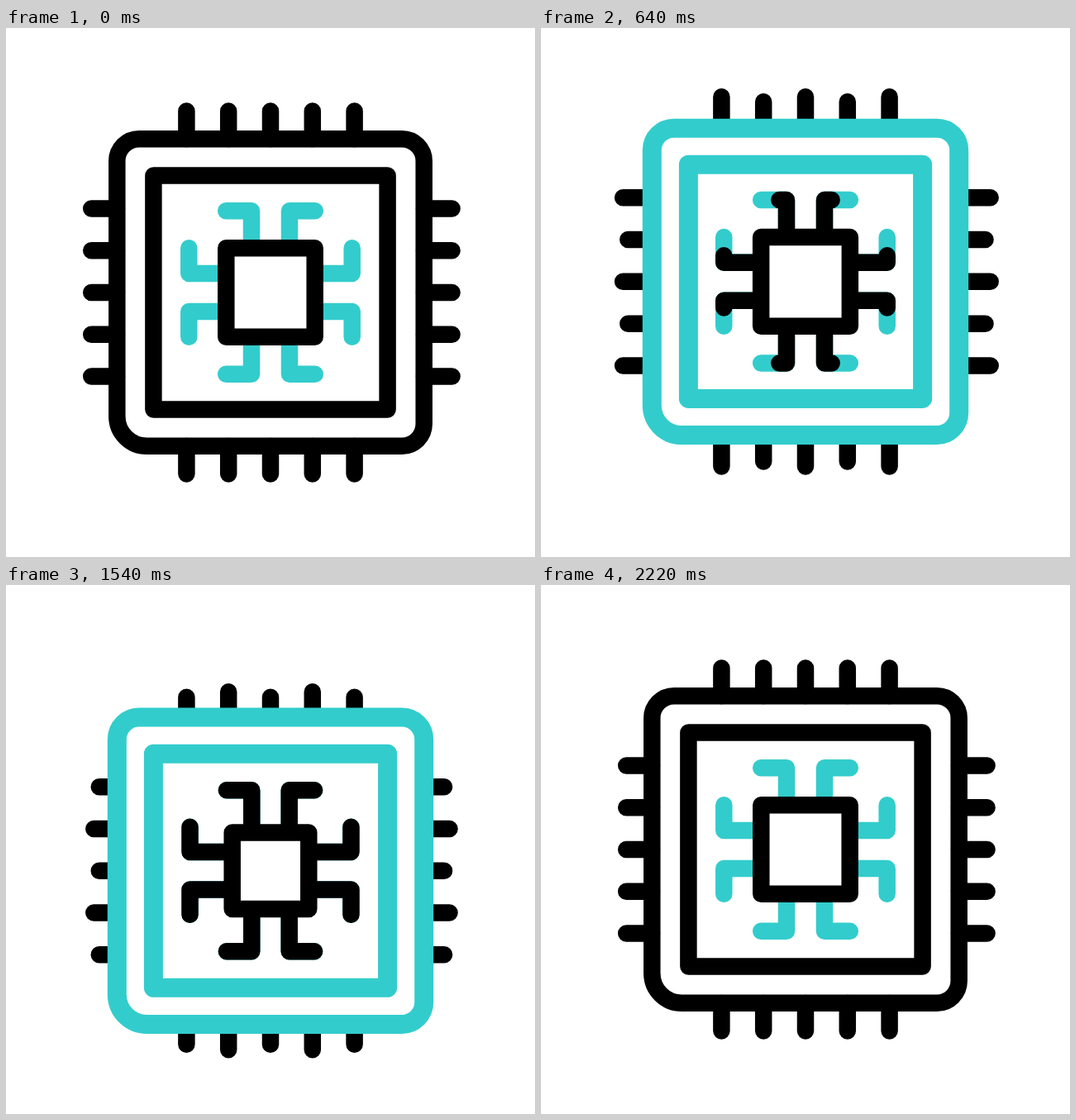
An HTML page with a canvas that plays this animation: 640x640 px, repeating every 2800 ms.

```html
<!DOCTYPE html>
<html>
<head>
<meta charset="utf-8">
<title>Processor</title>
<style>
html, body { margin: 0; width: 100%; height: 100%; overflow: hidden; background: #fff; }
canvas { display: block; width: 640px; height: 640px; }
</style>
</head>
<body>
<canvas id="stage" width="640" height="640"></canvas>
<script>
const ctx = document.getElementById('stage').getContext('2d');
const LOOP = 2800, INK = '#000', TEAL = '#33cccc', LINE = 20.5;

// Keys are [ms, offset]; values ease through them without overshoot.
const lift = track([[200, 0], [400, 26.5], [480, 12], [740, -23.7], [840, -28.3], [1220, -35.7],
  [1280, -36], [1540, 25.7], [1560, 26.3], [1820, -4], [1920, -11.5], [1960, -13], [2220, 0]]);
const oddPins = track([[200, 0], [390, -10], [480, -4.5], [740, 7.5], [840, 8.7], [1220, 11.2],
  [1270, 11.3], [1540, -9.5], [1560, -10], [1860, 6.2], [1920, 4.7], [2220, 0]]);
const evenPins = track([[200, 0], [400, -4], [465, -10.3], [480, -10], [840, 7.2], [1220, 11.2],
  [1290, 11.4], [1540, -3], [1610, -10], [1920, 5.7], [1945, 6.2], [2220, 0]]);
const coreSize = track([[200, 0], [400, -7.5], [480, -4.25], [840, 3.5], [1220, 5],
  [1280, 5.1], [1540, -7.4], [1560, -7.5], [1920, -2.7], [2220, 0]]);
const spread = track([[200, 0], [400, -2.5], [465, -6.3], [480, -6], [840, 6.1], [1220, 7.6],
  [1290, 7.7], [1540, -1.2], [1610, -6], [1920, 2.6], [1945, 2.9], [2220, 0]]);
const frameTrim = track([[220, 0], [460, 1], [1560, 1], [1880, 0]]);
const traceTrim = track([[360, 0], [800, 1], [1560, 1], [1880, 0]]);

function track(keys) {
  const slope = i => (keys[i + 1][1] - keys[i][1]) / (keys[i + 1][0] - keys[i][0]);
  const tangent = i => {
    if (i === 0 || i === keys.length - 1) return 0;
    const a = slope(i - 1), b = slope(i);
    return a * b > 0 ? 2 * a * b / (a + b) : 0;
  };
  return t => {
    if (t <= keys[0][0]) return keys[0][1];
    const i = keys.findIndex(k => k[0] > t) - 1;
    if (i < 0) return keys[keys.length - 1][1];
    const [t0, a] = keys[i], [t1, b] = keys[i + 1];
    const d = t1 - t0, u = (t - t0) / d, v = 1 - u;
    return a * v * v * (1 + 2 * u) + b * u * u * (3 - 2 * u)
      + d * u * v * (tangent(i) * v - tangent(i + 1) * u);
  };
}

// Strokes the first part p of a path with the given length.
function stroke(path, color, width, length = 0, p = 1) {
  if (p <= 0.001) return;
  ctx.strokeStyle = color;
  ctx.lineWidth = width;
  ctx.setLineDash(p < 0.999 ? [length * p, length * 2] : []);
  ctx.stroke(path);
}

function square(h, r = 0, bottomLeft = r) {
  const path = new Path2D();
  path.moveTo(-h, h - bottomLeft);
  path.arcTo(-h, -h, h, -h, r);
  path.arcTo(h, -h, h, h, r);
  path.arcTo(h, h, -h, h, r);
  path.arcTo(-h, h, -h, -h, bottomLeft);
  path.closePath();
  return { path, length: 8 * h - (2 - Math.PI / 2) * (3 * r + bottomLeft) };
}

const frames = [square(185.7, 26.7, 36), square(141.6)];

function drawPins(t) {
  const path = new Path2D();
  for (let i = 0; i < 5; i++) {
    const at = (i - 2) * 50.8;
    const end = 219.6 + (i % 2 ? evenPins(t) : oddPins(t));
    for (const [dir, far] of [[-1, end - 2.8], [1, end]]) {
      path.moveTo(at, dir * 186);
      path.lineTo(at, dir * end);
      path.moveTo(dir * 186, at);
      path.lineTo(dir * far, at);
    }
  }
  stroke(path, INK, LINE);
}

function drawTraces(t) {
  const s = 1 + spread(t) / 98.7;
  const near = 23 * s, tip = 53.8 * s, far = 98.7 * s, base = 55 * s;
  const length = far - base + tip - near;
  for (const [color, p] of [[TEAL, 1], [INK, traceTrim(t)]]) {
    for (const a of [-1, 1]) for (const b of [-1, 1]) for (const flip of [false, true]) {
      const path = new Path2D();
      const pts = [[near, base], [near, far], [tip, far]];
      pts.forEach(([u, v]) => flip ? path.lineTo(v * a, u * b) : path.lineTo(u * a, v * b));
      stroke(path, color, LINE, length, p);
    }
  }
}

function draw(t) {
  ctx.setTransform(1, 0, 0, 1, 0, 0);
  ctx.fillStyle = '#fff';
  ctx.fillRect(0, 0, 640, 640);
  ctx.translate(320, 320 + lift(t));
  ctx.lineCap = ctx.lineJoin = 'round';
  drawPins(t);
  for (const { path, length } of frames) {
    stroke(path, INK, LINE);
    stroke(path, TEAL, 23, length, frameTrim(t));
  }
  drawTraces(t);
  stroke(square(53.7 + coreSize(t)).path, INK, LINE);
}

const start = performance.now();
function tick() {
  draw((performance.now() - start) % LOOP);
  requestAnimationFrame(tick);
}
tick();
</script>
</body>
</html>
```
